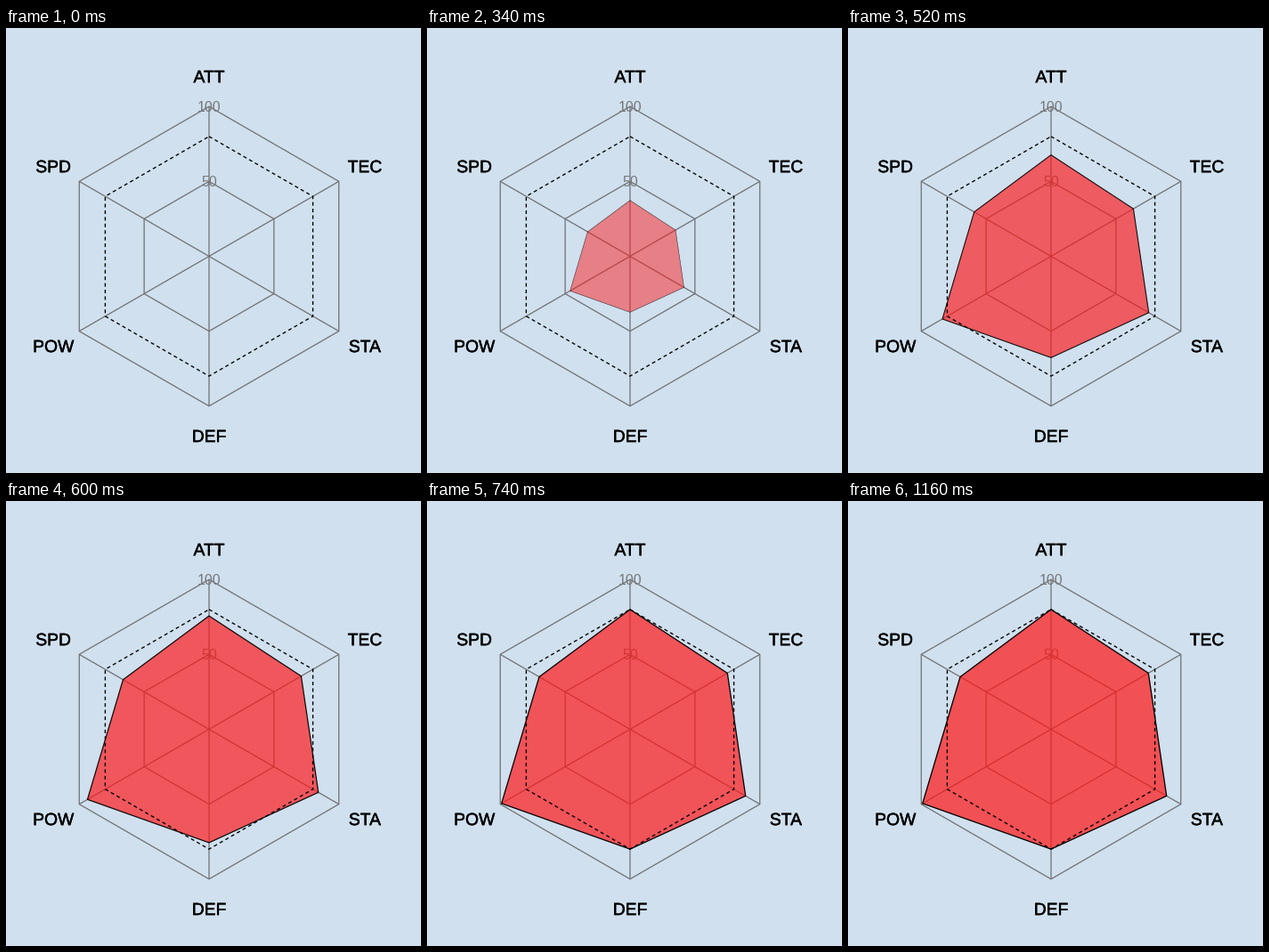
Write a matplotlib script that moves like this. It is 466 px wide and 500 px high and loops after 1180 ms.

```python
import numpy as np
import matplotlib.pyplot as plt
from matplotlib.animation import FuncAnimation
from matplotlib.patches import Polygon
from matplotlib.patheffects import withStroke

W, H, DPI = 466, 500, 100
PX = 72 / DPI                 # points per pixel
FRAMES, STEP = 59, 20
CENTER = np.array([228, 256.5])
RADIUS = 168.3
BG, GRID, RED = "#d0e0ee", "#6f7073", (254 / 255, 24 / 255, 24 / 255)
STATS = {"ATT": 80, "TEC": 75, "STA": 89, "DEF": 80, "POW": 99, "SPD": 70}

angles = np.radians(60 * np.arange(6))
spokes = np.column_stack([np.sin(angles), -np.cos(angles)])


def ring(values):
    """Corner points for values in percent along the six axes."""
    r = RADIUS * np.broadcast_to(values, 6) / 100
    return CENTER + spokes * r[:, None]


def hexagon(values, **style):
    shape = Polygon(ring(values), closed=True, joinstyle="miter", snap=False, **style)
    ax.add_patch(shape)
    return shape


def label(text, pos, size, color, weight, z):
    art = ax.text(pos[0], pos[1] + 0.344 * size, text, fontsize=size * PX,
                  family="Liberation Sans", color=color, ha="center",
                  va="baseline", zorder=z)
    if weight:
        art.set_path_effects([withStroke(linewidth=weight * PX, foreground=color)])


# cubic-bezier(.42, 0, .58, 1) as a lookup over its parameter
p = np.linspace(0, 1, 400)
bezier_x = 3 * (1 - p) ** 2 * p * 0.42 + 3 * (1 - p) * p ** 2 * 0.58 + p ** 3
bezier_y = 3 * (1 - p) * p ** 2 + p ** 3


def ease(t):
    return np.interp(t, bezier_x, bezier_y)


def opacity(ms):
    return np.interp(ms, [0, 240, 440, 520, 660, 900],
                     [0.1, 0.51, 0.83, 0.92, 0.965, 1])


fig = plt.figure(figsize=(W / DPI, H / DPI), dpi=DPI, facecolor=BG)
ax = fig.add_axes([0, 0, 1, 1])
ax.set_xlim(0, W)
ax.set_ylim(H, 0)
ax.axis("off")

for level in (50, 100):
    hexagon(level, fill=False, edgecolor=GRID, linewidth=1.25 * PX, zorder=1)
    label(str(level), ring(level)[0], 16, "#77797c", 0, 1)
for corner in ring(100):
    ax.plot(*zip(CENTER, corner), color=GRID, linewidth=1.25 * PX,
            solid_capstyle="butt", snap=False, zorder=1)

values = np.array(list(STATS.values()))
area = hexagon(values, zorder=2)
hexagon(80, fill=False, edgecolor="black", linewidth=1.35 * PX,
        linestyle=(0, (3, 2.5)), capstyle="butt", zorder=3)

for name, pos in zip(STATS, ring(120)):
    label(name, pos, 19.3, "black", 0.45, 4)


def update(i):
    ms = i * STEP
    scale = ease(min(1, (ms + 11) / 730))
    fade = opacity(ms)
    area.set_xy(ring(values * max(scale, 0.005)))
    area.set_facecolor((*RED, 0.72 * fade))
    area.set_edgecolor((0, 0, 0, fade))
    area.set_linewidth(1.3 * PX * scale)
    return [area]


anim = FuncAnimation(fig, update, frames=FRAMES, interval=STEP,
                     repeat=True, repeat_delay=0)
plt.show()
```
